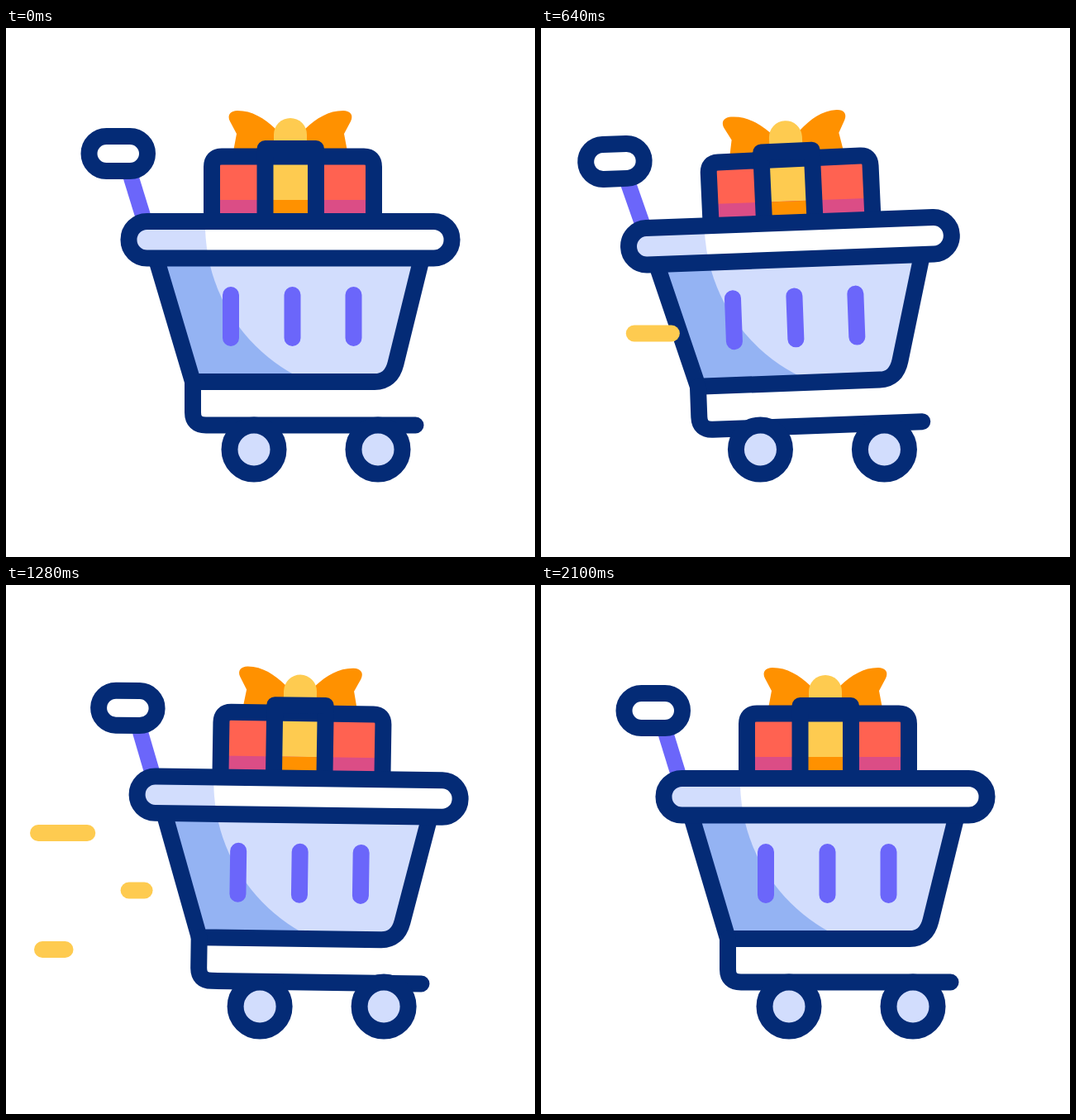
Animation, 640 px wide and 640 px high, one loop 2.6 s. Source, as an HTML page:

```html
<!DOCTYPE html>
<html lang="en">
<head>
<meta charset="utf-8">
<title>Gift cart</title>
<style>
html, body { margin: 0; width: 100%; height: 100%; overflow: hidden; background: #fff; }
svg { display: block; width: 100%; height: 100%; }
.ink { stroke: #042b76; stroke-width: 20; }
.bar { stroke: #6b66fa; stroke-width: 20; stroke-linecap: round; }
.dash { stroke: #fecb50; stroke-width: 20; stroke-linecap: round; }
</style>
</head>
<body>
<svg viewBox="0 0 640 640" fill="none">
  <defs>
    <path id="basketShape" d="M179 270L226 428H446Q466 428 471.500 406L505 270Z"/>
    <rect id="rimShape" x="148.500" y="234" width="391" height="44.500" rx="22"/>
    <path id="wing" d="M273 160L279 128L271 113C267 105 272 100 280 100C298 100 312 109 326 122V160Z" fill="#ff9100"/>
    <clipPath id="basketClip"><use href="#basketShape"/></clipPath>
    <clipPath id="rimClip"><use href="#rimShape"/></clipPath>
  </defs>

  <g id="body">
    <path d="M149.500 175L168 235" stroke="#6b66fa" stroke-width="19"/>
    <rect class="ink" x="100.500" y="131" width="70.500" height="42" rx="21" fill="#fff"/>

    <g id="gift">
      <g id="bow">
        <use href="#wing"/>
        <use href="#wing" transform="matrix(-1 0 0 1 688 0)"/>
      </g>
      <path d="M324 150V129a20 20 0 0 1 40 0V150Z" fill="#fecb50"/>
      <path d="M250 156H444V250H250Z" fill="#ff6251"/>
      <path d="M313 146H375V250H313Z" fill="#fecb50"/>
      <g id="shade">
        <path d="M250 208H444V250H250Z" fill="#db4d86"/>
        <path d="M313 208H375V250H313Z" fill="#ff9100"/>
      </g>
      <path class="ink" d="M249 250V168Q249 155.500 261 155.500H433Q445 155.500 445 168V250"/>
      <path class="ink" d="M313.500 250V146H375V250" stroke-linejoin="round"/>
    </g>

    <use href="#basketShape" fill="#94b3f3"/>
    <circle cx="448" cy="238" r="207" fill="#d2ddfd" clip-path="url(#basketClip)"/>
    <use href="#basketShape" class="ink" stroke-linejoin="round"/>
    <path class="bar" d="M272 323V375M346.500 323V375M420.500 323V375"/>
    <use href="#rimShape" fill="#d2ddfd"/>
    <circle cx="448" cy="238" r="207" fill="#fff" clip-path="url(#rimClip)"/>
    <use href="#rimShape" class="ink"/>
    <path class="ink" d="M226 428V465Q226 480.500 242 480.500H495.500" stroke-linecap="round"/>
  </g>

  <g id="wheels" class="ink" fill="#d2ddfd">
    <circle cx="300" cy="510" r="29.500"/>
    <circle cx="450" cy="510" r="29.500"/>
  </g>
  <g id="dashes"></g>
</svg>
<script>
const LOOP = 2600, REPEAT = 760;
const $ = id => document.getElementById(id);
const clamp = p => Math.min(1, Math.max(0, p));
const mix = (a, b, p) => a + (b - a) * p;

// Sways from one [time, value] pose to the next, easing in and out.
const sway = (...poses) => t => poses.reduce((value, [time, next], i) => {
  const from = i ? poses[i - 1][0] : 0;
  const p = clamp((t - from) / (time - from));
  return mix(value, next, (1 - Math.cos(Math.PI * p)) / 2);
}, 0);

const drive = sway([180, 0], [610, -35.3], [1060, 28], [1610, -32], [2100, 0]);
const tilt = sway([340, 0], [640, -2.15], [1060, 1.4], [1480, 0.3], [1780, 1.15], [2100, 0]);
const hop = sway([180, 0], [360, -0.97], [640, -0.35], [840, 2], [1060, -1.12], [1480, 1.05], [1800, 0]);

// The head runs left at once; the tail lags, then catches up.
const streaks = [
  { y: 300, from: 139, to: 39, start: 180, head: 340, tail: 460, ease: 1 },
  { y: 369.5, from: 168, to: 39, start: 456, head: 432, tail: 432, ease: 1 },
  { y: 441, from: 185, to: 44, start: 748, head: 411, tail: 573, ease: 2 }
];
for (const s of streaks) {
  s.path = document.createElementNS("http://www.w3.org/2000/svg", "path");
  s.path.setAttribute("class", "dash");
  $("dashes").append(s.path);
}

function drawStreak({ path, y, from, to, start, head, tail, ease }, t) {
  const age = t - start - (t < start + REPEAT ? 0 : REPEAT);
  const left = mix(from, to, 1 - (1 - clamp(age / head)) ** ease);
  const right = mix(from, to, clamp(age / tail) ** 3);
  path.setAttribute("d", age > 0 && age < tail ? `M${left} ${y}H${right}` : "");
}

const move = (id, value) => $(id).setAttribute("transform", value);

function draw() {
  const t = performance.now() % LOOP;
  const x = drive(t), h = hop(t);
  const sink = 0.2 * h * h - h; // drops deeper than it rises
  const turn = 1.35 * h;
  move("body", `translate(${x} ${3.6 * sink}) rotate(${tilt(t)} 345 470)`);
  move("wheels", `translate(${x})`);
  move("gift", `translate(0 ${4 * sink}) rotate(${turn} 347 228)`);
  move("shade", `rotate(${-turn} 347 228) translate(0 ${-4 * sink})`);
  move("bow", `rotate(${3.6 * h} 344 145)`);
  for (const s of streaks) drawStreak(s, t);
  requestAnimationFrame(draw);
}
draw();
</script>
</body>
</html>
```
